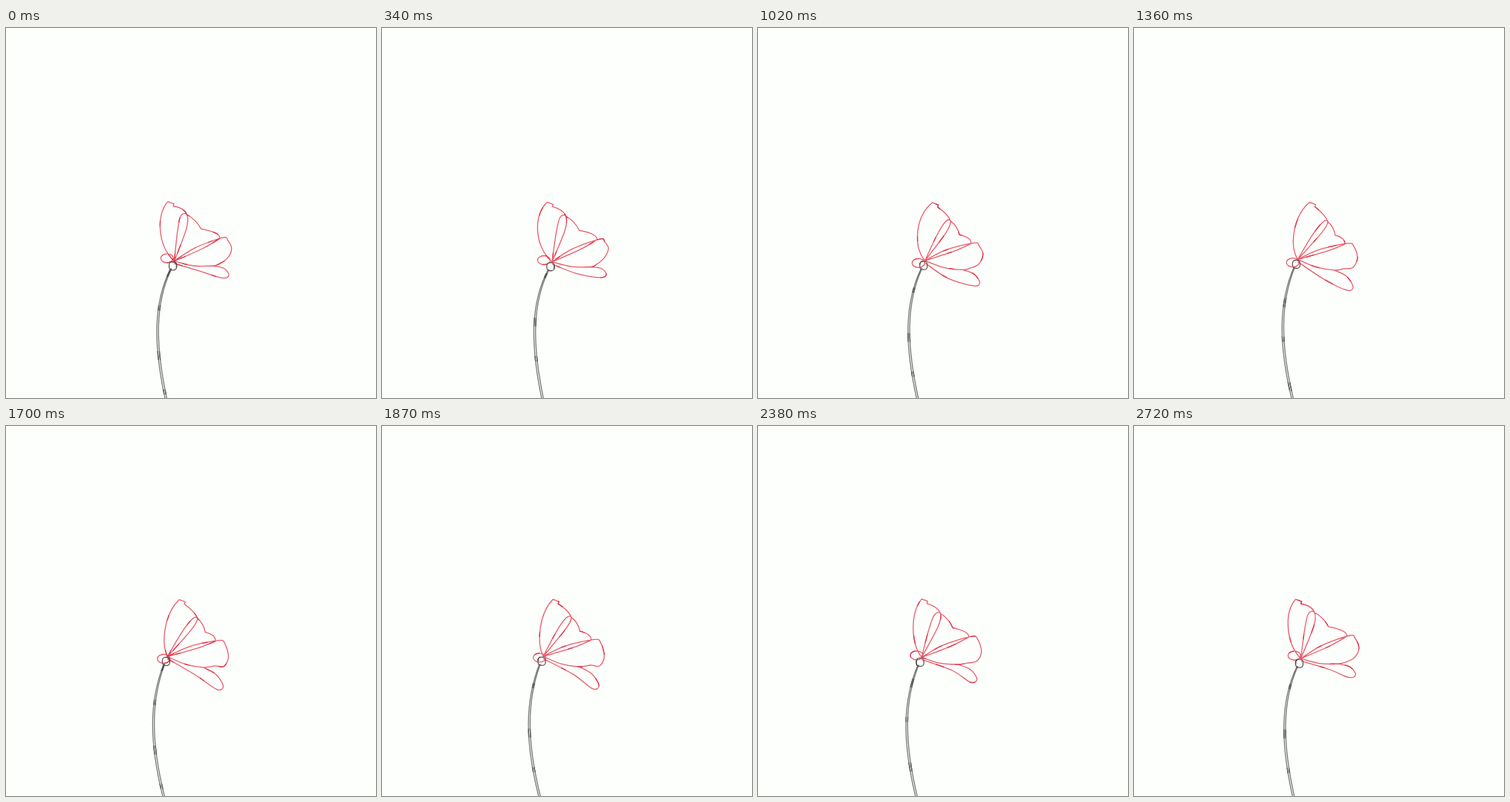
An HTML page with a canvas that plays this animation: 498 by 498 pixels, repeating every 2.89 s.

```html
<!DOCTYPE html>
<html lang="en">
<head>
<meta charset="utf-8">
<title>Swaying flower</title>
<style>
  html, body { margin: 0; height: 100%; overflow: hidden; background: #fdfffc; }
  canvas { display: block; }
</style>
</head>
<body>
<canvas id="stage" width="498" height="498"></canvas>
<script>
const ctx = document.getElementById('stage').getContext('2d');
const STEP = 170, STEPS = 17;

const move = ([x, y], dx, dy) => [x + dx, y + dy];
const mix = (a, b, fx, fy = fx) => [a[0] + (b[0] - a[0]) * fx, a[1] + (b[1] - a[1]) * fy];

// Smooth curve through all points.
function spline(path, ...pts) {
  path.moveTo(...pts[0]);
  for (let i = 0; i < pts.length - 1; i++) {
    const a = pts[i], b = pts[i + 1];
    const before = pts[i - 1] || a, after = pts[i + 2] || b;
    path.bezierCurveTo(
      a[0] + (b[0] - before[0]) / 6, a[1] + (b[1] - before[1]) / 6,
      b[0] - (after[0] - a[0]) / 6, b[1] - (after[1] - a[1]) / 6, ...b);
  }
}

// Pencil line: an even stroke with a few heavier dabs that shift each step.
function pencil(path, color, dabColor, step) {
  ctx.lineWidth = 1.3;
  ctx.strokeStyle = color;
  ctx.setLineDash([]);
  ctx.stroke(path);
  ctx.strokeStyle = dabColor;
  ctx.setLineDash([12, 40, 7, 55]);
  ctx.lineDashOffset = step * 23;
  ctx.stroke(path);
}

// The stem swings first, the petals droop after it, the outer ends drag behind.
function pose(step) {
  const wave = peak => Math.cos(2 * Math.PI * (step / STEPS - peak));
  const swing = wave(.15), droop = wave(.45), drag = wave(.57);
  return {
    base: [223 + 6 * swing, 312.5 + 2.3 * swing],
    tip: [227 + 9.5 * droop, 234 + swing + droop],
    flank: 209.5 + 2 * droop,
    shoulder: [252 + 9 * droop, 256 + 5 * droop],
    inner: [244.5 + 10 * droop, 257 + 4 * droop],
    notch: [285.5 + 4 * swing, 287 + 4 * droop],
    right: [302 + 2.8 * swing, 303.5 + 7 * drag],
    cleft: [273 + 8 * swing, 323 + 3 * droop],
    belly: [258.5 - 4 * droop, 332.5 + 5 * droop],
    lobe: [297 + 5 * swing, 341 + 9.5 * drag],
    leaf: [215 + 3 * swing, 312.5 + 2 * swing + 4 * droop],
    stemBend: 196 + 3.7 * swing,
    stemEnd: [213 + 2 * swing, 499]
  };
}

function drawStem({ base, stemBend, stemEnd }) {
  const path = new Path2D();
  for (const gap of [0, 2.4]) {
    path.moveTo(...move(base, gap / 2 - 5, 10));
    path.bezierCurveTo(stemBend + gap, 370, stemBend + gap, 425, stemEnd[0] + gap, stemEnd[1]);
  }
  return path;
}

function drawPetals({ base, tip, flank, shoulder, inner, notch, right, cleft, belly, lobe, leaf }) {
  const path = new Path2D();

  // Back petal with its ragged outer edge.
  path.moveTo(...base);
  path.bezierCurveTo(flank - 3, base[1] - 20, flank - 3 + (tip[0] - base[0]) * .4, tip[1] + 18, ...tip);
  path.lineTo(...move(tip, 8, 3));
  path.lineTo(...move(tip, 7, 6));
  path.quadraticCurveTo(shoulder[0] - 3, shoulder[1] - 9, ...shoulder);
  const waist = mix(shoulder, notch, .43, .6);
  path.quadraticCurveTo(...move(mix(shoulder, waist, .5), 3, -3), ...waist);
  path.quadraticCurveTo(notch[0] + 1, notch[1] - 8, ...notch);

  // Narrow middle petal.
  spline(path, base, move(mix(inner, base, .4), -1, -2), inner, shoulder,
    move(mix(shoulder, base, .33), 5, -2), base);

  // Round right petal.
  spline(path, notch, move(mix(notch, base, .4), 2, 1), base);
  spline(path, base, move(mix(base, notch, .45), 0, -4), move(notch, 4, -1),
    [right[0] - 5, notch[1] + 3], right, move(right, -6, 13),
    [right[0] - 18, cleft[1] - 2], cleft, move(mix(cleft, base, .5), 0, 3), base);

  // Lower lobe and small leaf.
  spline(path, move(base, 0, 3), belly, move(lobe, -9, 4), lobe,
    move(mix(lobe, cleft, .5), 4, -3), cleft);
  path.moveTo(leaf[0] + 8.5, leaf[1]);
  path.ellipse(...leaf, 8.5, 6, 0, 0, 2 * Math.PI);
  return path;
}

function drawCalyx({ base }) {
  const path = new Path2D();
  path.roundRect(base[0] - 7, base[1] + 1, 10, 11, 4);
  return path;
}

function frame(now) {
  const step = Math.floor(now / STEP) % STEPS;
  const p = pose(step);
  ctx.fillStyle = '#fdfffc';
  ctx.fillRect(0, 0, 498, 498);
  pencil(drawStem(p), '#777', '#555', step);
  pencil(drawPetals(p), '#ea5c6c', '#dc3a4e', step);
  pencil(drawCalyx(p), '#655', '#444', step);
  requestAnimationFrame(frame);
}
requestAnimationFrame(frame);
</script>
</body>
</html>
```
